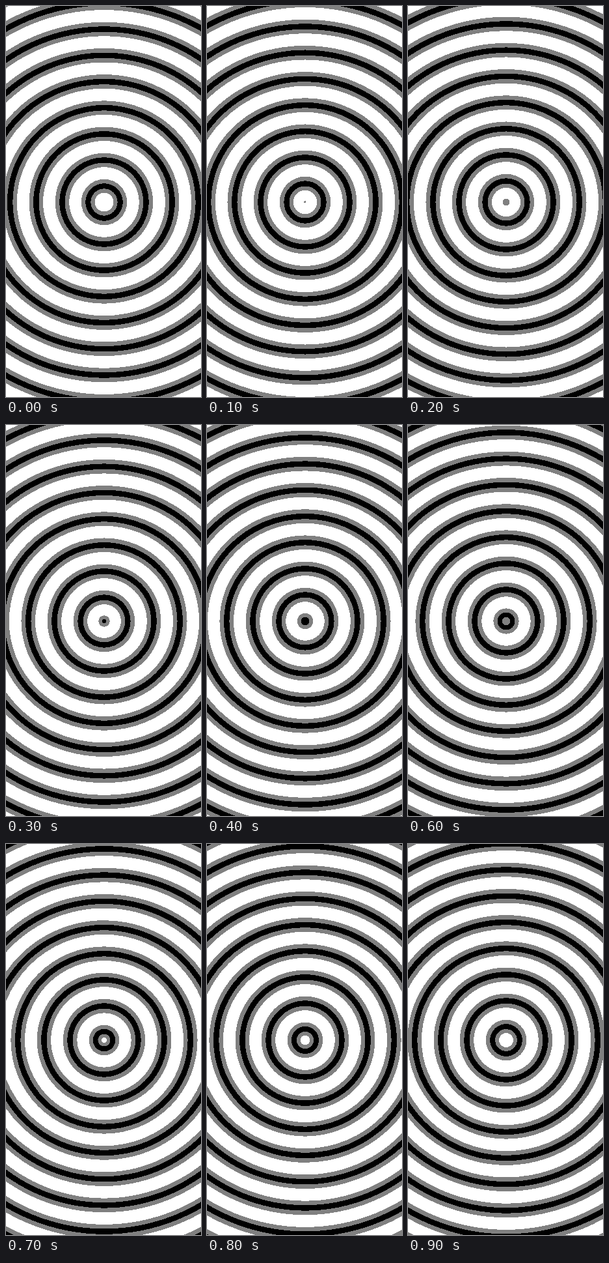
Write an HTML page that moves like this. It is 300 px wide and 600 px high and loops after 1000 ms.

```html
<!DOCTYPE html>
<html lang="en">
<head>
<meta charset="utf-8">
<title>Expanding rings</title>
<style>
  html, body { margin: 0; width: 100%; height: 100%; overflow: hidden; background: #fff; }
  svg { display: block; width: 100vw; height: 100vh; }
</style>
</head>
<body>
<svg viewBox="0 0 300 600"><g id="rings" transform="translate(151 301)" shape-rendering="crispEdges"></g></svg>
<script>
  const LOOP = 1000, STEPS = 10;
  const GAP = 40.2;      // distance between crests
  const START = 24.3;    // first crest at time zero
  const COUNT = 10;
  // Edges of one ring from outside in: offset from the crest, tone inside it
  const EDGES = [[10.8, "#808080"], [4.2, "#000"], [-4.2, "#808080"], [-10.8, "#fff"]];

  const group = document.getElementById("rings");
  const discs = [];
  for (let n = COUNT - 1; n >= -1; n--) {
    for (const [offset, fill] of EDGES) {
      const disc = document.createElementNS("http://www.w3.org/2000/svg", "circle");
      disc.setAttribute("fill", fill);
      group.appendChild(disc);
      discs.push({ disc, base: START + n * GAP + offset });
    }
  }

  // Edges leave the centre slightly ahead and settle to an even pace
  const radius = x => Math.max(0, x + 3 * Math.exp(-Math.abs(x) / 12));

  function draw(time) {
    const step = Math.floor((time % LOOP) / LOOP * STEPS);
    const shift = step * GAP / STEPS;
    for (const { disc, base } of discs) {
      disc.setAttribute("r", radius(base + shift).toFixed(2));
    }
  }

  const start = performance.now();
  function tick() {
    draw(performance.now() - start);
    requestAnimationFrame(tick);
  }
  tick();
</script>
</body>
</html>
```
